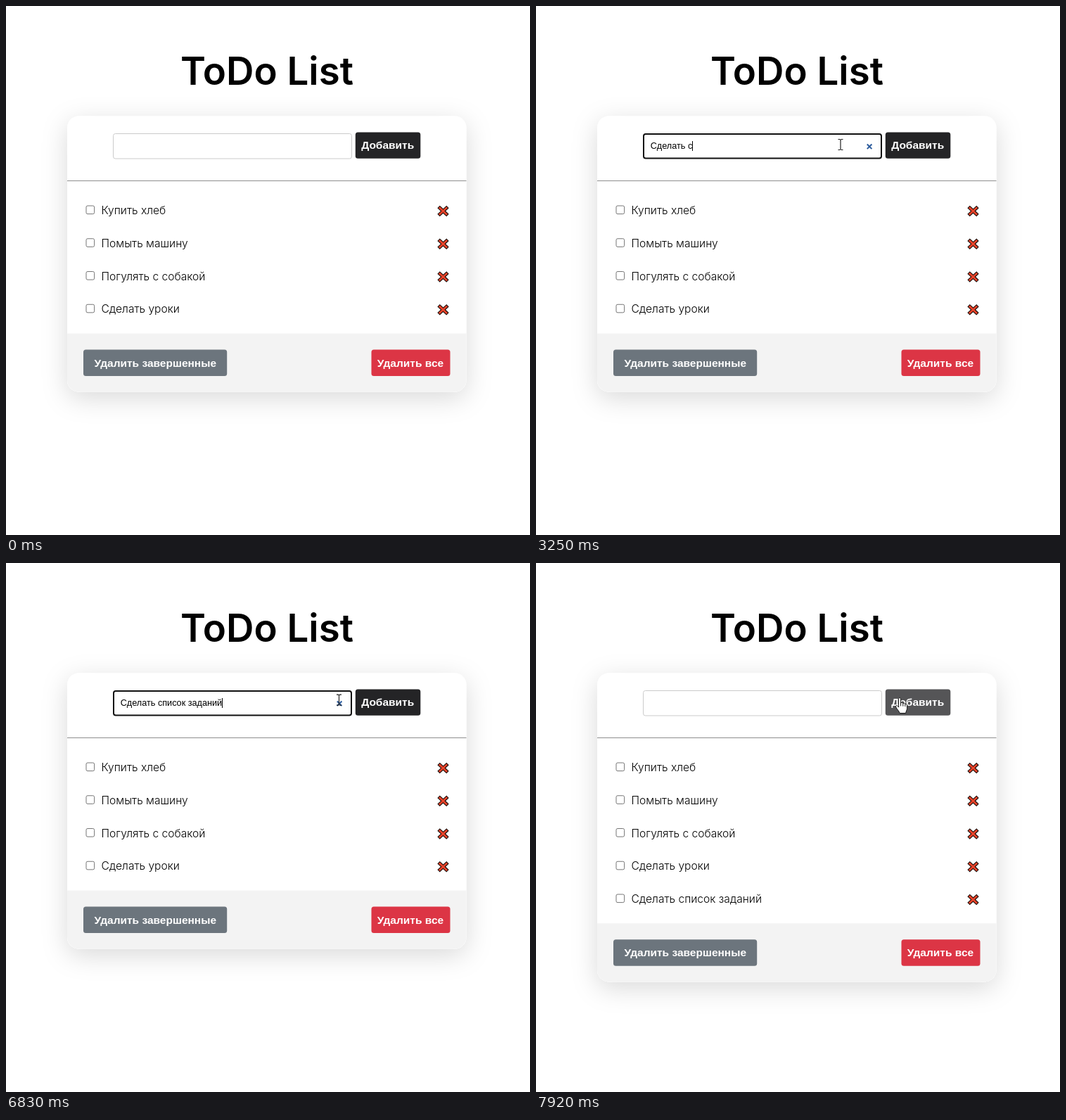
These frames come from a looping animation (745 px wide and 752 px high, 8 s). An HTML page:

```html
<!DOCTYPE html>
<html lang="ru">
<head>
<meta charset="utf-8">
<title>ToDo List</title>
<style>
  html, body { margin: 0; width: 100%; height: 100%; overflow: hidden; background: #fff; }
  svg { display: block; width: 100%; height: 100%; }
  text { white-space: pre; font-optical-sizing: none; }
  .title { font: 600 54.6px Inter, sans-serif; font-optical-sizing: none; text-anchor: middle; }
  .task { font: 300 15.58px Inter, sans-serif; font-optical-sizing: none; }
  .typed { font: 12.67px "Liberation Sans", Arial, sans-serif; }
  .label { font: bold 15.5px "Liberation Sans", Arial, sans-serif; fill: #fff; text-anchor: middle; }
</style>
</head>
<body>
<svg viewBox="0 0 745 752">
  <defs>
    <filter id="shadow" x="-20%" y="-20%" width="140%" height="150%">
      <feDropShadow dx="0" dy="9" stdDeviation="18" flood-color="#000" flood-opacity=".15"/>
    </filter>
    <g id="cross" fill="none" stroke-linecap="square">
      <path d="M-4.7-4.4 4.7 4.4M4.7-4.4-4.7 4.4" stroke="#1c100c" stroke-width="4.9"/>
      <path d="M-4.7-4.4 4.7 4.4M4.7-4.4-4.7 4.4" stroke="#e8432a" stroke-width="2.7"/>
    </g>
  </defs>

  <text class="title" x="371" y="112">ToDo List</text>
  <rect id="card" x="87" y="156.5" width="567.5" rx="17" fill="#fff" filter="url(#shadow)"/>
  <path d="M87 248.5H654.5" stroke="#8e8e8e"/>

  <rect id="field" rx="3" fill="#fff"/>
  <text id="typed" class="typed" x="162.7" y="203"></text>
  <path id="caret" d="M.5 192V206" stroke="#000"/>
  <path id="clear" d="M470.8 196.5 477.4 203.1M477.4 196.5 470.8 203.1" stroke="#2c5b9c" stroke-width="2"/>

  <rect id="add" x="496.8" y="179.5" width="92.5" height="37.3" rx="3.5"/>
  <text class="label" x="542.7" y="203.3">Добавить</text>

  <g id="rows"></g>

  <g id="footer">
    <path d="M87 465.5H654.5V531.5A17 17 0 0 1 637.5 548.5H104A17 17 0 0 1 87 531.5Z" fill="#f3f3f3"/>
    <rect x="110" y="488.6" width="204.2" height="37.3" rx="3.5" fill="#6c757d"/>
    <text class="label" x="212.3" y="512.5">Удалить завершенные</text>
    <rect x="519.5" y="488.6" width="112" height="37.3" rx="3.5" fill="#dc3545"/>
    <text class="label" x="575" y="512.5">Удалить все</text>
  </g>

  <path id="beam" fill="none" stroke="#222" stroke-width="1.2"
    d="M-3.5-7.5H-1.5L0-6.8 1.5-7.5H3.5M0-6.8V6.8M-3.5 7.5H-1.5L0 6.8 1.5 7.5H3.5"/>
  <g id="hand" stroke="#111" stroke-linejoin="round" stroke-linecap="round">
    <path fill="#fff" d="M-1.6 1.2C-1.6-.8 1.6-.8 1.6 1.2V7.2C2.4 6 4.6 6.3 4.8 7.7 5.8 6.7 7.7 7.1 7.9 8.6 9 7.9 10.6 8.6 10.6 10.2V14.5C10.6 17 9 18.3 8.7 21.5H.2C-.4 18.8-3.4 16.6-5.2 13 -6.2 11-3.9 9.8-2.8 11.3L-1.6 12.8Z"/>
    <path fill="none" d="M1.6 7.2V11M4.8 8V11.3M7.9 9V11.6"/>
  </g>
</svg>
<script>
const LOOP = 8000;
const PITCH = 46.75;
const TASKS = ['Купить хлеб', 'Помыть машину', 'Погулять с собакой', 'Сделать уроки', 'Сделать список заданий'];
const ENTRY = TASKS[4];
// Time at which each character of the entry is typed
const KEYS = [1580, 1920, 2250, 2500, 2670, 2830, 2920, 3080, 3170, 3420, 3920,
  4000, 4830, 4920, 5000, 5170, 5420, 5500, 5670, 5750, 5920, 6080];
const FOCUS = 1080, CLICK = 7080, ADDED = 7330;

const $ = id => document.getElementById(id);
const [card, field, typed, caret, clear, add, rows, footer, beam, hand] =
  ['card', 'field', 'typed', 'caret', 'clear', 'add', 'rows', 'footer', 'beam', 'hand'].map($);

const set = (el, attrs) => {
  for (const name in attrs) el.setAttribute(name, attrs[name]);
};
const show = (el, on) => set(el, { visibility: on ? 'visible' : 'hidden' });
const place = (el, x, y) => set(el, { transform: `translate(${x} ${y})` });
const progress = (t, from, to) => Math.min(1, Math.max(0, (t - from) / (to - from)));
const ease = p => p * p * (3 - 2 * p);
const mix = (a, b, p) => a + (b - a) * p;

rows.innerHTML = TASKS.map((task, i) => `<g transform="translate(0 ${i * PITCH})">
  <rect x="114" y="284" width="11.6" height="11.6" rx="2" fill="#fff" stroke="#767676"/>
  <text class="task" x="135.5" y="296">${task}</text>
  <use href="#cross" x="621.5" y="291.5"/>
</g>`).join('');
const newRow = rows.lastElementChild;

// The border stays inside the field's outer box at any thickness
function drawField(border, color) {
  set(field, {
    x: 152 + border / 2, y: 181 + border / 2,
    width: 340 - border, height: 36.5 - border,
    stroke: color, 'stroke-width': border
  });
}

function render(t) {
  const focused = t >= FOCUS && t < CLICK;
  const count = focused ? KEYS.filter(k => k <= t).length : 0;
  const added = t >= ADDED;

  if (focused) drawField(2, '#101010');
  else drawField(1, '#cbcbcb');
  typed.textContent = ENTRY.slice(0, count);
  const end = count ? typed.getComputedTextLength() : 0;
  place(caret, Math.round(162.7 + end), 0);
  show(caret, focused && !(t >= 4330 && t < 4830));
  show(clear, count > 0);

  show(newRow, added);
  set(card, { height: 392 + (added ? PITCH : 0) });
  place(footer, 0, added ? PITCH : 0);

  const move = ease(progress(t, 6670, 7000));
  const x = mix(433, 517, move), y = mix(197, 192, move);
  const over = x >= 497;
  place(beam, x, y);
  place(hand, x, y);
  show(beam, t >= 830 && !over);
  show(hand, over);

  const hover = progress(t, 6920, 7120);
  set(add, { fill: `rgb(${[36, 36, 38].map(c => Math.round(mix(c, c + 49, hover)))})` });
}

const start = performance.now();
function tick() {
  render((performance.now() - start) % LOOP);
  requestAnimationFrame(tick);
}
tick();
</script>
</body>
</html>
```
